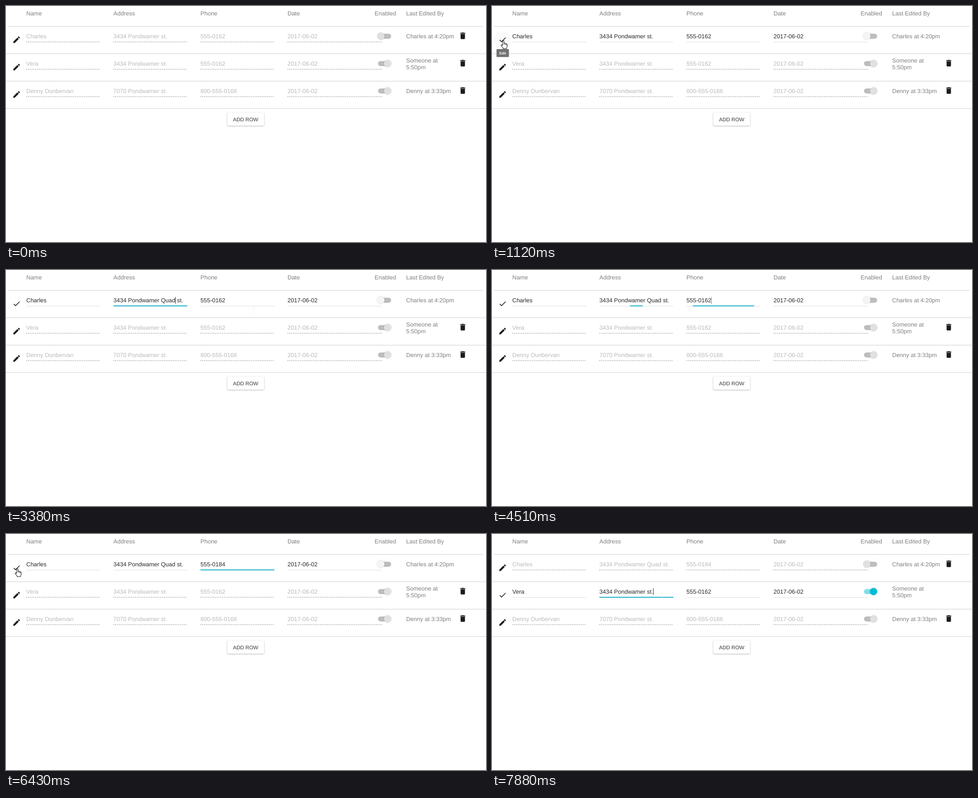
An HTML page that plays this animation: 1064 px wide and 526 px high, repeating every 8 s.

```html
<!DOCTYPE html>
<html lang="en">
<head>
<meta charset="utf-8">
<title>Editable table</title>
<style>
  html, body { margin: 0; width: 100%; height: 100%; overflow: hidden; background: #fff; }
  svg { display: block; }
  text { font: 13px "Liberation Sans", Arial, sans-serif; white-space: pre; text-rendering: geometricPrecision; }
  .button { filter: drop-shadow(0 1px 1.5px rgba(0, 0, 0, .3)); }
  .thumb { filter: drop-shadow(0 .6px 1px rgba(0, 0, 0, .22)); }
</style>
</head>
<body>
<svg id="stage" width="1064" height="526" viewBox="0 0 1064 526"></svg>
<script>
const LOOP = 8000, ROW = 61, CYAN = '#00bcd4';
const stage = document.getElementById('stage');
const pen = document.createElement('canvas').getContext('2d');
pen.font = '130px "Liberation Sans", Arial, sans-serif';

const ICONS = {
  edit: 'M3 17.25V21h3.75L17.81 9.94l-3.75-3.75zM20.71 7.04a1 1 0 0 0 0-1.41l-2.34-2.34a1 1 0 0 0-1.41 0l-1.83 1.83 3.75 3.75z',
  done: 'M9 16.17L4.83 12l-1.42 1.41L9 19 21 7l-1.41-1.41z',
  trash: 'M6 19c0 1.1.9 2 2 2h8c1.1 0 2-.9 2-2V7H6zM19 4h-3.5l-1-1h-5l-1 1H5v2h14z'
};
const HAND = 'M-1.6 1.2Q0-.8 1.6 1.2V6.2Q3.4 5 4.4 6.8 6.2 5.8 6.8 7.6 8.4 7 8.6 9V13Q8.4 15 7.2 16.5V18H-.4V16.5L-4.6 11.5Q-5 9-3 9.6L-1.6 11Z';

const COLUMNS = [[45, 164], [238, 164], [431, 164], [624, 209.5]];
const HEADERS = [[45, 'Name'], [238, 'Address'], [431, 'Phone'], [624, 'Date'], [817, 'Enabled'], [887, 'Last Edited By']];
const ROWS = [
  { cells: ['Charles', '3434 Pondwamer st.', '555-0162', '2017-06-02'], on: false, by: ['Charles at 4:20pm'], edit: [960, 6590] },
  { cells: ['Vera', '3434 Pondwamer st.', '555-0162', '2017-06-02'], on: true, by: ['Someone at', '5:50pm'], edit: [7230, LOOP] },
  { cells: ['Denny Dunbervan', '7070 Pondwamer st.', '800-555-0166', '2017-06-02'], on: true, by: ['Denny at 3:33pm'], edit: [LOOP, LOOP] }
];
// row, column, focused from, focused until
const FOCUS = [[0, 1, 1280, 4350], [0, 2, 4350, 6430], [1, 1, 7390, 9000]];
// row, pressed at
const PRESSES = [[0, 800], [0, 6430], [1, 7070]];
// row, shown from, shown until
const TIPS = [[0, 640, 1280], [0, 6590, 6910], [1, 6910, 7390]];
const POINTER = [
  [160, 330, 160], [640, 25, 77], [1120, 25, 77], [1600, 305, 67], [1760, 549, 91], [3550, 549, 91],
  [4350, 487, 67], [4510, 487, 67], [4830, 472, 67], [5310, 503, 80], [5790, 503, 80], [6430, 25, 77],
  [6590, 25, 77], [6910, 34, 125], [7070, 34, 125], [7390, 370, 130], [7720, 377, 137]
];

const clamp = v => Math.max(0, Math.min(1, v));
const during = (t, a, b) => t >= a && t < b;
const easeOut = p => 1 - (1 - clamp(p)) ** 4;
const width = s => pen.measureText(s).width / 10;
const rect = (x, y, w, h, fill, more = '') => `<rect x="${x}" y="${y}" width="${w}" height="${h}" fill="${fill}" ${more}/>`;
const text = (x, y, s, fill, more = '') => `<text x="${x}" y="${y}" fill="${fill}" ${more}>${s}</text>`;
const icon = (name, x, y) => `<path d="${ICONS[name]}" fill="#1c1c1c" transform="translate(${x} ${y}) scale(.811)"/>`;

// The screen refreshes every 160 ms, counted from the latest restart.
function tick(t) {
  const start = [0, 2090, 2420, 3710, 7720].filter(s => s <= t).pop();
  return start + Math.floor((t - start) / 160) * 160;
}

// Text, caret position and selected range of a field.
function fieldState(r, c, t) {
  let value = ROWS[r].cells[c], caret = -1, sel = null;
  if (r === 0 && c === 1) {
    const typed = ' Quad'.slice(0, Math.max(0, Math.floor((t - 2420) / 160)));
    value = value.slice(0, 14) + typed + value.slice(14);
    if (during(t, 1600, 2420)) sel = [5, 14];
    if (during(t, 2420, 4350)) caret = 14 + typed.length;
  }
  if (r === 0 && c === 2) {
    if (t >= 5470) value = value.slice(0, 6) + (t < 5630 ? '8' : '84');
    if (during(t, 4670, 5470)) sel = [t < 4830 ? 7 : 6, 8];
    else if (during(t, 4350, 6430)) caret = value.length;
  }
  if (r === 1 && c === 1 && t >= 7390) caret = value.length;
  return { value, caret, sel };
}

function field(r, c, t, editing) {
  const [x, w] = COLUMNS[c], y = r * ROW;
  const { value, caret, sel } = fieldState(r, c, t);
  let out = '', label = value;
  if (sel) {
    const [a, b] = sel, left = width(value.slice(0, a));
    out += rect(x + left, 60 + y, width(value.slice(0, b)) - left, 15, '#3390fc');
    label = `${value.slice(0, a)}<tspan fill="#fff">${value.slice(a, b)}</tspan>${value.slice(b)}`;
  }
  out += text(x, 72 + y, label, editing ? '#2a2a2a' : '#bababa');
  if (caret >= 0) out += rect(x + width(value.slice(0, caret)), 60 + y, 1, 15, '#222');
  if (!editing) {
    return out + `<path d="M${x} ${80 + y}h${w}" stroke="#a2a2a2" stroke-width="1.6" stroke-dasharray="2 2"/>`;
  }
  out += rect(x, 80 + y, w, 1, '#dedede');
  for (const [fr, fc, a, b] of FOCUS) {
    if (fr !== r || fc !== c) continue;
    const grow = w * (easeOut((t - a) / 450) - easeOut((t - b) / 450));
    if (grow > 0) out += rect(x + (w - grow) / 2, 79 + y, grow, 2, '#1cb0c5');
  }
  return out;
}

function toggle(y, on, editing) {
  const lit = on && editing;
  const thumb = lit ? CYAN : editing ? '#f5f5f5' : '#e0e0e0';
  return rect(824.6, 61.7 + y, 29.2, 11.3, lit ? '#80deea' : '#bdbdbd', 'rx="5.65"') +
    `<circle class="thumb" cx="${on ? 845.8 : 831}" cy="${67.3 + y}" r="8.1" fill="${thumb}"/>`;
}

function row(r, t) {
  const { on, by, edit } = ROWS[r], y = r * ROW, editing = during(t, ...edit);
  const top = by.length > 1 ? 65 : 72;
  return icon(editing ? 'done' : 'edit', 13.8, 65.4 + y) +
    COLUMNS.map((_, c) => field(r, c, t, editing)).join('') +
    toggle(y, on, editing) +
    by.map((line, i) => text(887, top + y + i * 15, line, '#808080')).join('') +
    (editing ? '' : icon('trash', 1002.8, 56.6 + y)) +
    rect(0, 106 + y, 1064, 1, '#cdcdcd');
}

function ripple([r, start], t) {
  const p = (t - start) / 520;
  if (p <= 0 || p >= 1) return '';
  return `<circle cx="23.5" cy="${75 + r * ROW}" r="${19.5 * easeOut(p * 1.3)}" opacity="${.13 * (1 - p) ** 2}"/>`;
}

function tip([r, a, b], t) {
  if (!during(t, a, b)) return '';
  const y = r * ROW;
  return rect(10, 96 + y, 27.5, 17.8, '#727272', 'rx="1.6"') +
    text(23.7, 107.7 + y, 'Edit', '#fff', 'text-anchor="middle" style="font-size:8px;font-weight:bold"');
}

function pointer(t) {
  const next = POINTER.findIndex(k => k[0] > t);
  if (next === 0) return '';
  const to = POINTER.at(next), from = next < 0 ? to : POINTER[next - 1];
  const p = clamp((t - from[0]) / (to[0] - from[0] || 1)), s = p * p * (3 - 2 * p);
  const x = from[1] + (to[1] - from[1]) * s, y = from[2] + (to[2] - from[2]) * s;
  const shape = x < 45
    ? `<path d="${HAND}" fill="#fff" stroke="#111" stroke-width="1.1" stroke-linejoin="round"/><path d="M1.6 6V9.5M4.4 7V10M6.8 8V10.5" stroke="#111" stroke-width=".8"/>`
    : '<path d="M-2-6H2M0-6V6M-2 6H2" stroke="#f1f1f1" fill="none"/>';
  return `<g transform="translate(${x} ${y})">${shape}</g>`;
}

function draw(t) {
  stage.innerHTML =
    HEADERS.map(([x, s]) => text(x, 20.7, s, '#808080')).join('') +
    rect(4, 45, 1054, 1, '#cdcdcd') +
    ROWS.map((_, r) => row(r, t)).join('') +
    rect(490.5, 237.5, 81.5, 29.2, '#fff', 'rx="1.6" class="button"') +
    text(531.2, 256.8, 'ADD ROW', '#383838', 'text-anchor="middle" style="font-size:11.6px"') +
    PRESSES.map(p => ripple(p, t)).join('') +
    TIPS.map(p => tip(p, t)).join('') +
    pointer(t);
}

let origin, shown = -1;
function loop(now) {
  origin ??= now;
  const t = tick((now - origin) % LOOP);
  if (t !== shown) draw(shown = t);
  requestAnimationFrame(loop);
}
requestAnimationFrame(loop);
</script>
</body>
</html>
```
